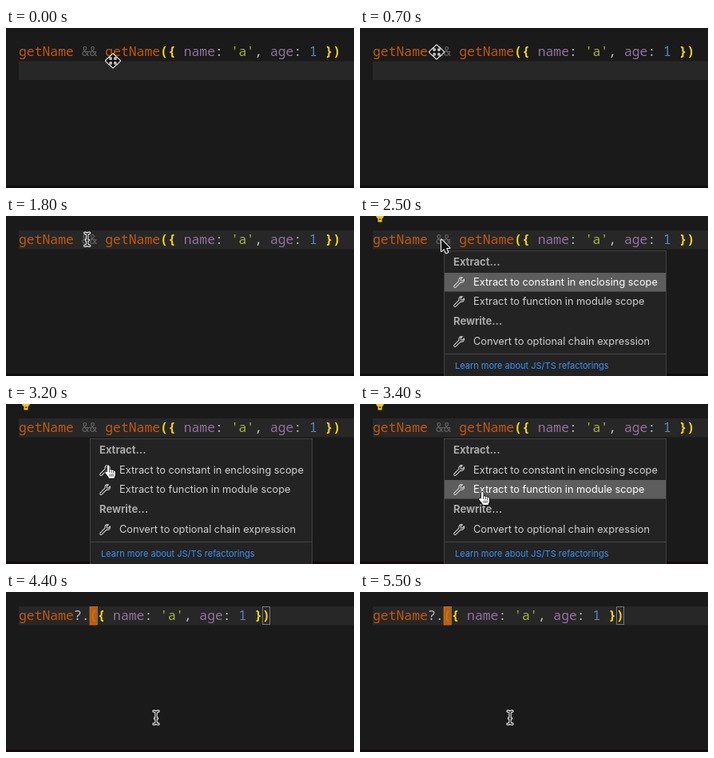
Recreate the animation shown at these times as an HTML page with a canvas. Size 436 by 200 pixels, loop 5600 ms.

```html
<!DOCTYPE html>
<html lang="en">
<head>
<meta charset="utf-8">
<title>Refactor to optional chain</title>
<style>
html, body { margin: 0; width: 100%; height: 100%; overflow: hidden; background: #1a1a1a; }
canvas { display: block; width: 436px; height: 200px; }
</style>
</head>
<body>
<canvas></canvas>
<script>
const W = 436, H = 200, LOOP = 5600;
const LEFT = 16, CHAR = 9.84, LINE_TOP = 18, LINE_H = 23.5;
const CLICK = 1000, MENU_OPEN = 2100, MENU_CLOSE = 4250, EDIT = 4380;
const MENU = { x: 106, y: 44, w: 277, h: 160 };
const MONO = '16.4px "Noto Sans Mono", monospace';
const UI = 'Inter, sans-serif';

const canvas = document.querySelector('canvas');
const ctx = canvas.getContext('2d');
const dpr = window.devicePixelRatio || 1;
canvas.width = W * dpr;
canvas.height = H * dpr;

const ORANGE = '#c4580f', YELLOW = '#f7d51d', PURPLE = '#92729f', PLAIN = '#c4c4c4', DIM = '#5d5d5d';
const ARGS = [
  ['({ ', YELLOW], ['name', PURPLE], [': ', PLAIN], ["'a'", '#a5b43a'], [', ', PLAIN],
  ['age', PURPLE], [': ', PLAIN], ['1 ', '#5f86bd'], ['})', YELLOW]
];
const BEFORE = [['getName ', ORANGE], ['&& ', DIM], ['getName', ORANGE], ...ARGS];
const AFTER = [['getName', ORANGE], ['?.', PLAIN], ...ARGS];

const ROWS = [
  { y: 83, text: 'Extract to constant in enclosing scope' },
  { y: 107, text: 'Extract to function in module scope' },
  { y: 157, text: 'Convert to optional chain expression' }
];

// time, x, y
const PATH = [
  [0, 134, 41], [100, 134, 41], [650, 96, 30], [750, 96, 30], [1000, 101, 30],
  [2100, 102, 29], [2800, 102, 29], [3200, 128, 77], [3680, 188, 157], [LOOP, 188, 157]
];

const clamp = v => Math.max(0, Math.min(1, v));
const colX = col => LEFT + col * CHAR;

function pointerAt(t) {
  const i = PATH.findIndex(p => p[0] > t);
  const [t0, x0, y0] = PATH[i - 1], [t1, x1, y1] = PATH[i];
  let k = (t - t0) / (t1 - t0);
  if (t < CLICK) k = k * k * (3 - 2 * k);
  return { x: x0 + (x1 - x0) * k, y: y0 + (y1 - y0) * k };
}

// Smooth blink: 200 ms solid, 200 ms fade, 400 ms hidden, 200 ms fade.
function blink(t, center) {
  const d = Math.abs(((t - center + 500) % 1000 + 1000) % 1000 - 500);
  return clamp((300 - d) / 200);
}

function caretAlpha(t) {
  if (t < CLICK) return blink(t, 350);
  if (t < MENU_OPEN) return clamp((1700 - t) / 200);
  if (t < MENU_CLOSE) return 0;
  return blink(t, 4500);
}

function rect(x, y, w, h, color) {
  ctx.fillStyle = color;
  ctx.fillRect(x, y, w, h);
}

function label(text, x, y, font, color) {
  ctx.font = font;
  ctx.fillStyle = color;
  ctx.fillText(text, x, y);
}

function drawCode(tokens) {
  let col = 0;
  ctx.textBaseline = 'alphabetic';
  for (const [text, color] of tokens) {
    const weight = color === YELLOW ? '600 ' : '500 ';
    for (const ch of text) label(ch, colX(col++), 34.5, weight + MONO, color);
  }
}

function drawEditor(t) {
  const edited = t >= EDIT;
  const line = t < CLICK ? 1 : 0;
  rect(0, 0, W, H, '#1a1a1a');
  rect(0, 197, W, 3, '#120b0f');
  rect(LEFT, LINE_TOP + line * LINE_H, W - LEFT, LINE_H, '#272727');
  drawCode(edited ? AFTER : BEFORE);
  if (edited) {
    ctx.strokeStyle = '#777';
    ctx.lineWidth = 1;
    for (const col of [9, 31]) ctx.strokeRect(Math.round(colX(col)) + .5, 18.5, 9, 22);
  } else {
    rect(97, 29, 16, 1, DIM);
  }
  ctx.globalAlpha = caretAlpha(t) * .9;
  rect(colX(line ? 0 : 9), LINE_TOP + line * LINE_H, CHAR - .5, LINE_H, '#c9650f');
  ctx.globalAlpha = 1;
}

function drawBulb() {
  ctx.fillStyle = '#f5c518';
  ctx.beginPath();
  ctx.arc(25, -1, 5, 0, Math.PI * 2);
  ctx.fill();
  rect(22.5, 2, 5, 5.5, '#f5c518');
  rect(24, 3.5, 2, 1.5, '#1a1a1a');
}

const WRENCH = new Path2D('M1 11.2 7 5.2C6.2 2.5 8.5 0 11.2.8L9 3l.4 1.8 1.8.4 2.2-2.2C14.2 5.7 11.7 8 9 7.2l-6 6C1.8 14.2 0 12.4 1 11.2Z');

function hoveredRow(t) {
  if (pointerAt(t).y < MENU.y) return 0;
  const y = pointerAt(t - 60).y;
  return ROWS.findIndex(r => Math.abs(y - r.y) < 12 && y > 74);
}

function drawMenu(t) {
  const { x, y: top, w, h } = MENU;
  rect(x - 1, top - 1, w + 2, h, '#404040');
  rect(x, top, w, h, '#232324');
  const active = hoveredRow(t);
  ctx.textBaseline = 'middle';
  label('Extract...', 117, 58.5, '700 13px ' + UI, '#a9a9a9');
  label('Rewrite...', 117, 132.5, '700 13px ' + UI, '#a9a9a9');
  ROWS.forEach(({ y, text }, i) => {
    if (i === active) rect(x, y - 12, w, 23.5, '#5d5d5d');
    label(text, 142, y + .5, '12.8px ' + UI, i === active ? '#fff' : '#d0d0d0');
    ctx.save();
    ctx.translate(117, y - 7);
    ctx.strokeStyle = '#d0d0d0';
    ctx.lineWidth = 1.1;
    ctx.stroke(WRENCH);
    ctx.restore();
  });
  rect(x, 172, w, 1, '#454545');
  label('Learn more about JS/TS refactorings', 119, 187.5, '11px ' + UI, '#3b92f5');
}

const SHAPES = {
  move: new Path2D('M-9 0-4.5-4.5V-1.3H-1.3V-4.5H-4L0-8.5 4-4.5H1.3V-1.3H4.5V-4.5L9 0 4.5 4.5V1.3H1.3V4.5H4L0 8.5-4 4.5H-1.3V1.3H-4.5V4.5Z'),
  beam: new Path2D('M-3-8Q0-8 0-5.5Q0-8 3-8M0-6V6M-3 8Q0 8 0 5.5Q0 8 3 8M-1.5 1H1.5'),
  arrow: new Path2D('M0 .5V15L3.4 11.9 5.8 17.3 8.2 16.2 5.9 11H10.4Z'),
  hand: new Path2D('M-1.2 8V.8C-1.2-1 1.4-1 1.4.8V5.2C2.4 4.3 3.7 4.7 4 5.7 5 5 6.3 5.4 6.5 6.5 7.6 6 8.8 6.7 8.8 8V11C8.8 13 7.6 13.6 7.5 15.5H.6C.5 13.5-2 11.8-3.6 9.2-4.4 7.6-2.6 6.5-1.2 8Z')
};
const KNUCKLES = new Path2D('M1.4 5V8M4 6V8.5M6.5 7V9M2 10.5V13M4 10.5V13M6 10.5V13');

function pointerShape(t, y) {
  if (t < CLICK) return 'move';
  if (t < MENU_OPEN || t >= MENU_CLOSE) return 'beam';
  return y > 71 ? 'hand' : 'arrow';
}

function drawPointer(t) {
  const { x, y } = pointerAt(t);
  const shape = pointerShape(t, y), path = SHAPES[shape];
  const stroke = (width, color, outline = path) => {
    ctx.lineWidth = width;
    ctx.strokeStyle = color;
    ctx.stroke(outline);
  };
  const fill = color => {
    ctx.fillStyle = color;
    ctx.fill(path);
  };
  ctx.save();
  ctx.translate(x, y);
  ctx.lineJoin = ctx.lineCap = 'round';
  if (shape === 'beam') {
    stroke(3.4, '#eee');
    stroke(1.2, '#111');
  } else if (shape === 'hand') {
    stroke(1.8, '#111');
    fill('#fff');
    stroke(.8, '#222', KNUCKLES);
  } else {
    stroke(2.2, '#f4f4f4');
    fill('#111');
  }
  ctx.restore();
}

function frame() {
  const t = performance.now() % LOOP;
  ctx.setTransform(dpr, 0, 0, dpr, 0, 0);
  drawEditor(t);
  if (t >= MENU_OPEN && t < MENU_CLOSE) {
    drawBulb();
    drawMenu(t);
  }
  drawPointer(t);
  requestAnimationFrame(frame);
}
frame();
</script>
</body>
</html>
```
